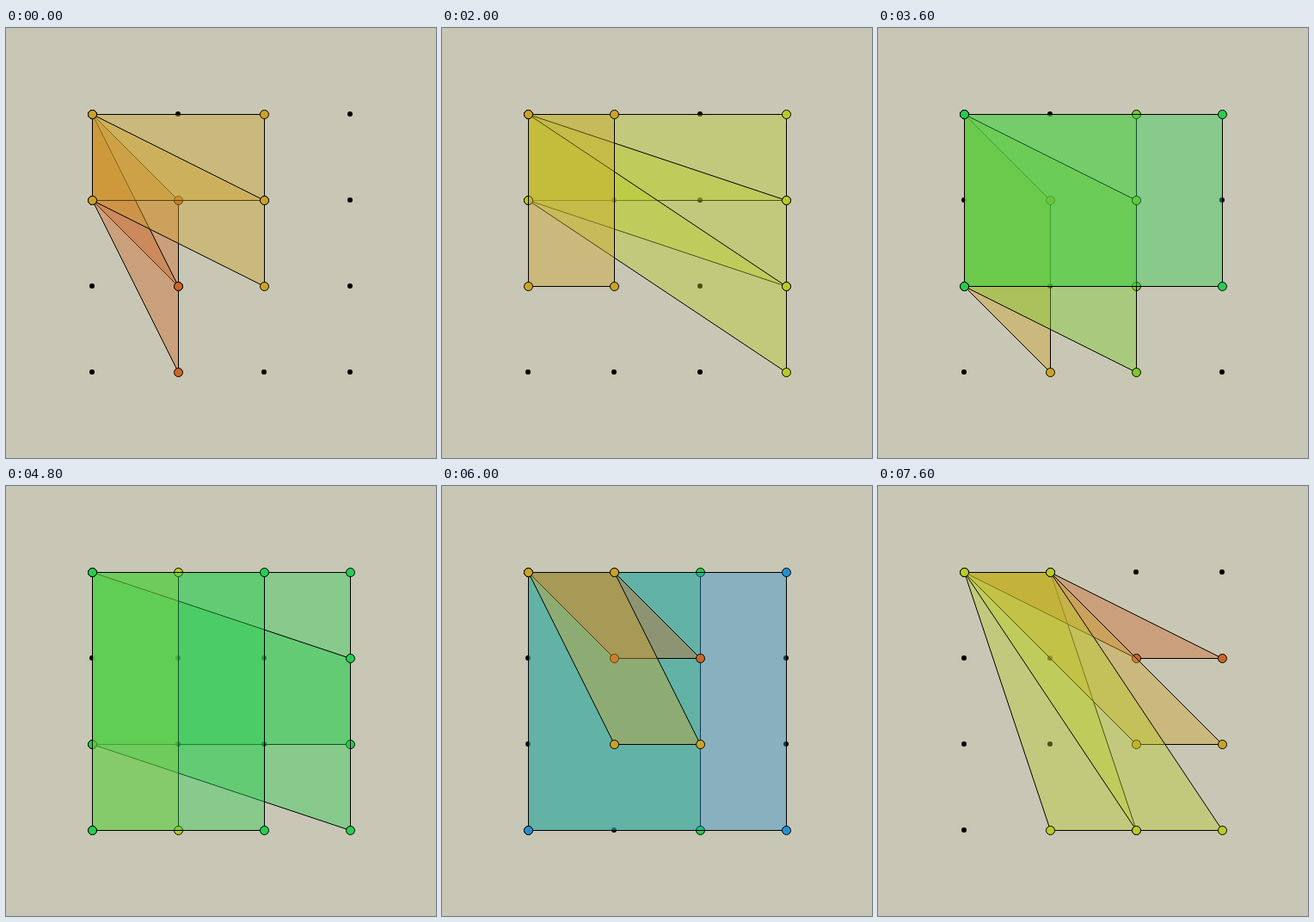
An HTML page that plays this animation: 500x500 px, repeating every 8000 ms.

```html
<!DOCTYPE html>
<html lang="en">
<head>
<meta charset="utf-8">
<title>Lattice parallelograms</title>
<style>
  html, body { margin: 0; width: 100%; height: 100%; overflow: hidden; background: #c8c6b4; }
  svg { display: block; width: 100vw; height: 100vh; }
</style>
</head>
<body>
<svg viewBox="0 0 500 500">
  <g id="grid"></g>
  <g id="shapes" transform="translate(.5 .5)" stroke="#000" stroke-width="1" stroke-linejoin="round"></g>
</svg>
<script>
const SIZE = 4, STEP = 400, STEPS = 20, TRAIL = 4, FIRST = 1;
const pos = n => 100 + n * 100;
const det = ([a, b], [c, d]) => Math.abs(a * d - b * c);

// Lattice points, column by column
const points = Array.from({ length: SIZE * SIZE }, (_, i) => [Math.floor(i / SIZE), i % SIZE]);

// Every pair of vectors whose parallelogram fits on the grid
const pairs = [];
points.forEach((v, i) => points.slice(i + 1).forEach(u => {
  const fits = u[0] + v[0] < SIZE && u[1] + v[1] < SIZE;
  if (fits && det(u, v)) pairs.push([u, v]);
}));

// The area sets the hue; saturation and brightness are both 0.8
function areaColor(area) {
  const hue = area * 360 / 16;
  const channel = n => {
    const k = (n + hue / 60) % 6;
    return Math.round(204 * (1 - 0.8 * Math.max(0, Math.min(k, 4 - k, 1))));
  };
  return `rgb(${channel(5)},${channel(3)},${channel(1)})`;
}

function shape([u, v]) {
  const corners = [[0, 0], u, [u[0] + v[0], u[1] + v[1]], v];
  const color = areaColor(det(u, v));
  const outline = corners.map(c => c.map(pos).join()).join(" ");
  const dots = corners.map(([x, y]) => `<circle cx="${pos(x)}" cy="${pos(y)}" r="5"/>`).join("");
  return `<g fill="${color}"><polygon points="${outline}" fill-opacity=".4"/>${dots}</g>`;
}

const shapes = document.getElementById("shapes");
document.getElementById("grid").innerHTML =
  points.map(([x, y]) => `<circle cx="${pos(x)}" cy="${pos(y)}" r="3"/>`).join("");

let shown = -1;
function draw(time) {
  const step = Math.floor(time / STEP) % STEPS;
  if (step === shown) return;
  shown = step;
  const start = FIRST + step;
  shapes.innerHTML = pairs.slice(start, start + TRAIL).map(shape).join("");
}

const begin = performance.now();
function tick() {
  draw(performance.now() - begin);
  requestAnimationFrame(tick);
}
tick();
</script>
</body>
</html>
```
